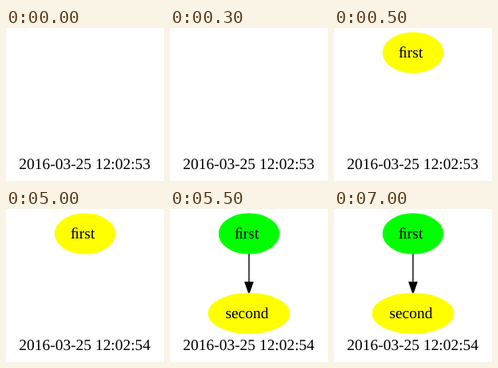
Recreate the animation shown at these times as an HTML page. Size 198 by 192 pixels, loop 8 s.

```html
<!DOCTYPE html>
<html lang="en">
<head>
<meta charset="utf-8">
<style>
  html, body { margin: 0; width: 100%; height: 100%; overflow: hidden; background: #fff; }
  svg { display: block; width: 198px; height: 192px; }
  text {
    font: 19.44px "Liberation Serif", "Times New Roman", serif;
    text-anchor: middle;
    text-rendering: geometricPrecision;
  }
  .active { fill: #ff0; stroke: #ff0; }
  .done { fill: #0f0; stroke: #0f0; }
  ellipse, path { stroke-width: 1.39; }
</style>
</head>
<body>
<svg viewBox="0 0 198 192">
  <g id="first">
    <ellipse id="firstNode" cx="99" cy="31" rx="37.5" ry="25"/>
    <text x="96.2" y="37">&#xFB01;rst</text>
  </g>
  <g id="second">
    <path d="M99 56.4V92M94.1 92H103.9L99 105.9Z" stroke="#000"/>
    <ellipse class="active" cx="99" cy="131" rx="50.7" ry="25"/>
    <text x="96.4" y="137">second</text>
  </g>
  <text id="clock" x="98.7" y="177"></text>
</svg>
<script>
  const LOOP = 8000, FIRST_START = 500, CLOCK_TICK = 5000, SECOND_START = 5500;
  const byId = id => document.getElementById(id);
  const show = (id, visible) => byId(id).setAttribute("visibility", visible ? "visible" : "hidden");
  const start = performance.now();

  function render(now) {
    const t = Math.max(0, now - start) % LOOP;
    show("first", t >= FIRST_START);
    show("second", t >= SECOND_START);
    byId("firstNode").setAttribute("class", t < SECOND_START ? "active" : "done");
    byId("clock").textContent = "2016-03-25 12:02:" + (t < CLOCK_TICK ? 53 : 54);
    requestAnimationFrame(render);
  }
  render(start);
</script>
</body>
</html>
```
